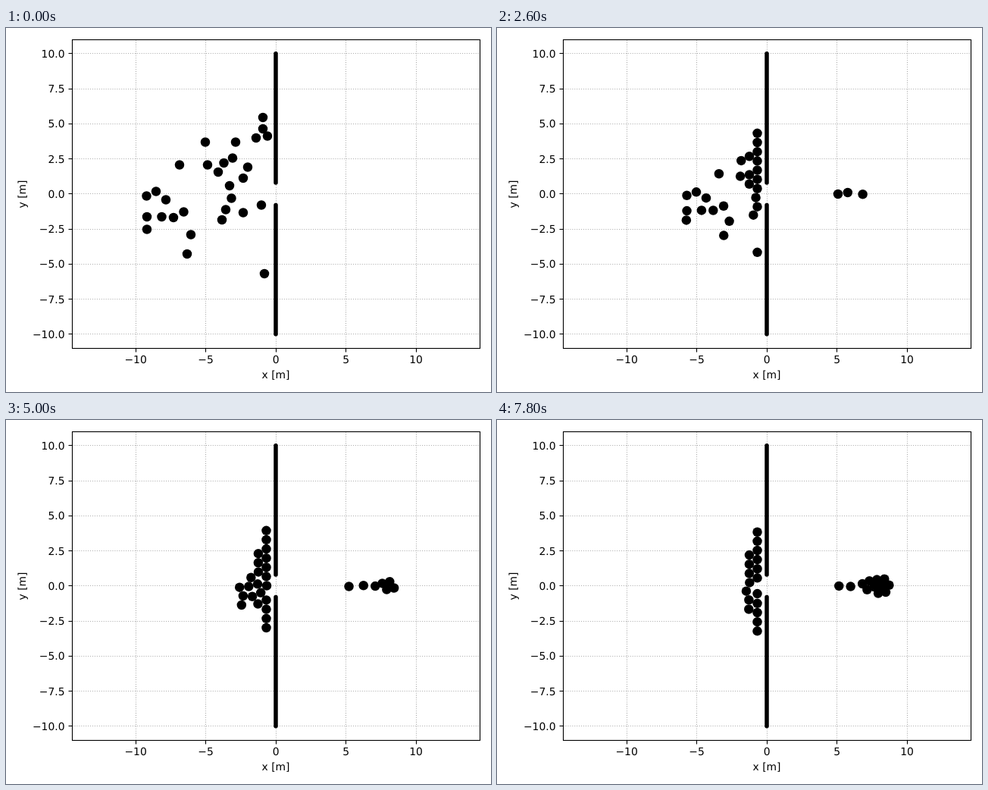
An HTML page that plays this animation: 640 by 480 pixels, repeating every 8 s.

```html
<!DOCTYPE html>
<html lang="en">
<head>
<meta charset="utf-8">
<title>Crowd at a door</title>
<style>
  html, body { margin: 0; width: 100%; height: 100%; overflow: hidden; background: #fff; }
  svg { display: block; width: 640px; height: 480px; }
  text { font: 13.89px "DejaVu Sans", sans-serif; text-rendering: geometricPrecision; }
  .frame { fill: none; stroke: #000; stroke-width: 1.11; }
  .grid { stroke: #b0b0b0; stroke-width: 1.11; stroke-dasharray: 1.11 1.83; }
  .wall { stroke: #000; stroke-width: 5.5; stroke-linecap: round; }
</style>
</head>
<body>
<svg id="plot" viewBox="0 0 640 480"></svg>
<script>
const plot = document.getElementById('plot');
const LEFT = 87.5, RIGHT = 625.5, TOP = 15.5, BOTTOM = 422.5;
const STEP = 200, FRAMES = 40, SUBSTEPS = 10, DT = STEP / 1000 / SUBSTEPS;

// Crowd model, in pixels and seconds.
const MID = 218.5, WALL_LIMIT = 343.5, DOOR_X = 355, BEYOND_X = 450;
const FIRST_RELEASE = 0.98, RELEASE_GAP = 0.57, REACTION = 0.1, WALL_DRAG = 0.6;
const PHASES = {
  waiting: { aim: 435, speed: 26 },
  leaving: { aim: 357, speed: 26 },
  out: { aim: 505, speed: 32 }
};
const starts = [
  [339, 118], [339, 133], [345, 142.5], [330, 145], [303, 150.5], [263, 150.5],
  [299, 171.5], [287.5, 178], [266, 180.5], [280, 190], [319, 183.5], [313, 198],
  [295, 208], [297.5, 224.5], [290, 239.5], [285, 253], [313, 243.5], [337, 233.5],
  [341, 324], [229, 180.5], [198, 215.5], [185.5, 221.5], [211, 226.5], [186, 249],
  [205.5, 249], [221, 250], [234.5, 242.5], [186, 265.5], [244, 272.5], [239, 298]
];

function walk(w) {
  const { aim, speed } = PHASES[w.phase];
  const dx = aim - w.x, dy = MID - w.y, distance = Math.hypot(dx, dy);
  if (!distance) return;
  const k = Math.min(1, speed * DT / distance);
  const atWall = w.phase === 'waiting' && w.x > WALL_LIMIT - 1;
  w.x += dx * k;
  w.y += dy * k * (atWall ? WALL_DRAG : 1);
}

// Pushes two people apart; someone in the doorway does not yield.
function separate(a, b) {
  const out = a.phase === 'out';
  if (out !== (b.phase === 'out')) return;
  const dx = b.x - a.x, dy = b.y - a.y, distance = Math.hypot(dx, dy) || 0.01;
  const overlap = (out ? 10 : 12.2) - distance;
  if (overlap <= 0) return;
  const fixedA = a.phase === 'leaving', fixedB = b.phase === 'leaving';
  const shareA = fixedA ? 0 : fixedB ? 1 : 0.5, shareB = fixedB ? 0 : fixedA ? 1 : 0.5;
  const px = dx / distance * overlap, py = dy / distance * overlap;
  a.x -= px * shareA; a.y -= py * shareA;
  b.x += px * shareB; b.y += py * shareB;
}

function releaseNearest(crowd) {
  const distance = w => Math.hypot(DOOR_X - w.x, MID - w.y);
  const waiting = crowd.filter(w => w.phase === 'waiting');
  waiting.reduce((a, b) => distance(a) < distance(b) ? a : b).phase = 'leaving';
}

function simulate() {
  const crowd = starts.map(([x, y]) => ({ x, y, phase: 'waiting' }));
  const frames = [];
  let released = 0;
  for (let n = 0; n < FRAMES * SUBSTEPS; n++) {
    const t = n * DT;
    if (n % SUBSTEPS === 0) frames.push(crowd.map(({ x, y }) => [x, y]));
    if (t < REACTION) continue;
    if (t >= FIRST_RELEASE + released * RELEASE_GAP) {
      releaseNearest(crowd);
      released++;
    }
    crowd.forEach(walk);
    for (let pass = 0; pass < 4; pass++) {
      crowd.forEach((a, i) => crowd.slice(i + 1).forEach(b => separate(a, b)));
      for (const w of crowd) if (w.phase === 'waiting') w.x = Math.min(w.x, WALL_LIMIT);
    }
    for (const w of crowd) {
      if (w.phase === 'leaving' && w.x >= DOOR_X) Object.assign(w, { phase: 'out', x: BEYOND_X });
    }
  }
  return frames;
}

function add(tag, attrs, text = '') {
  const el = document.createElementNS('http://www.w3.org/2000/svg', tag);
  for (const key in attrs) el.setAttribute(key, attrs[key]);
  el.textContent = text;
  return plot.appendChild(el);
}
const line = (cls, x1, y1, x2, y2) => add('line', { class: cls, x1, y1, x2, y2 });
const label = (text, x, y, anchor = 'middle', more = {}) =>
  add('text', { x, y, 'text-anchor': anchor, ...more }, text);
const toX = v => 356.1 + 18.5 * v;
const toY = v => 218.75 - 18.5 * v;
const snap = v => Math.floor(v) + 0.5;
const signed = s => s.replace('-', '\u2212');

for (let v = -10; v <= 10; v += 5) {
  const x = snap(toX(v));
  line('grid', x, BOTTOM, x, TOP);
  line('frame', x, BOTTOM, x, BOTTOM + 5);
  label(signed(String(v)), toX(v), 442);
}
for (let v = -10; v <= 10; v += 2.5) {
  const y = snap(toY(v));
  line('grid', LEFT, y, RIGHT, y);
  line('frame', LEFT - 5, y, LEFT, y);
  label(signed(v.toFixed(1)), 77.5, Math.round(toY(v)) + 5, 'end');
}
label('x [m]', 356, 462);
label('y [m]', 0, 0, 'middle', { transform: 'translate(26 219) rotate(-90)' });

for (const side of [1, -1]) line('wall', 356, toY(10 * side), 356, toY(0.8 * side));
const dots = starts.map(() => add('circle', { r: 6.25 }));
add('rect', { class: 'frame', x: LEFT, y: TOP, width: RIGHT - LEFT, height: BOTTOM - TOP });

const frames = simulate();
function draw() {
  const now = Math.floor(performance.now() / STEP) % FRAMES;
  frames[now].forEach(([x, y], i) => {
    dots[i].setAttribute('cx', x);
    dots[i].setAttribute('cy', y);
  });
  requestAnimationFrame(draw);
}
draw();
</script>
</body>
</html>
```
